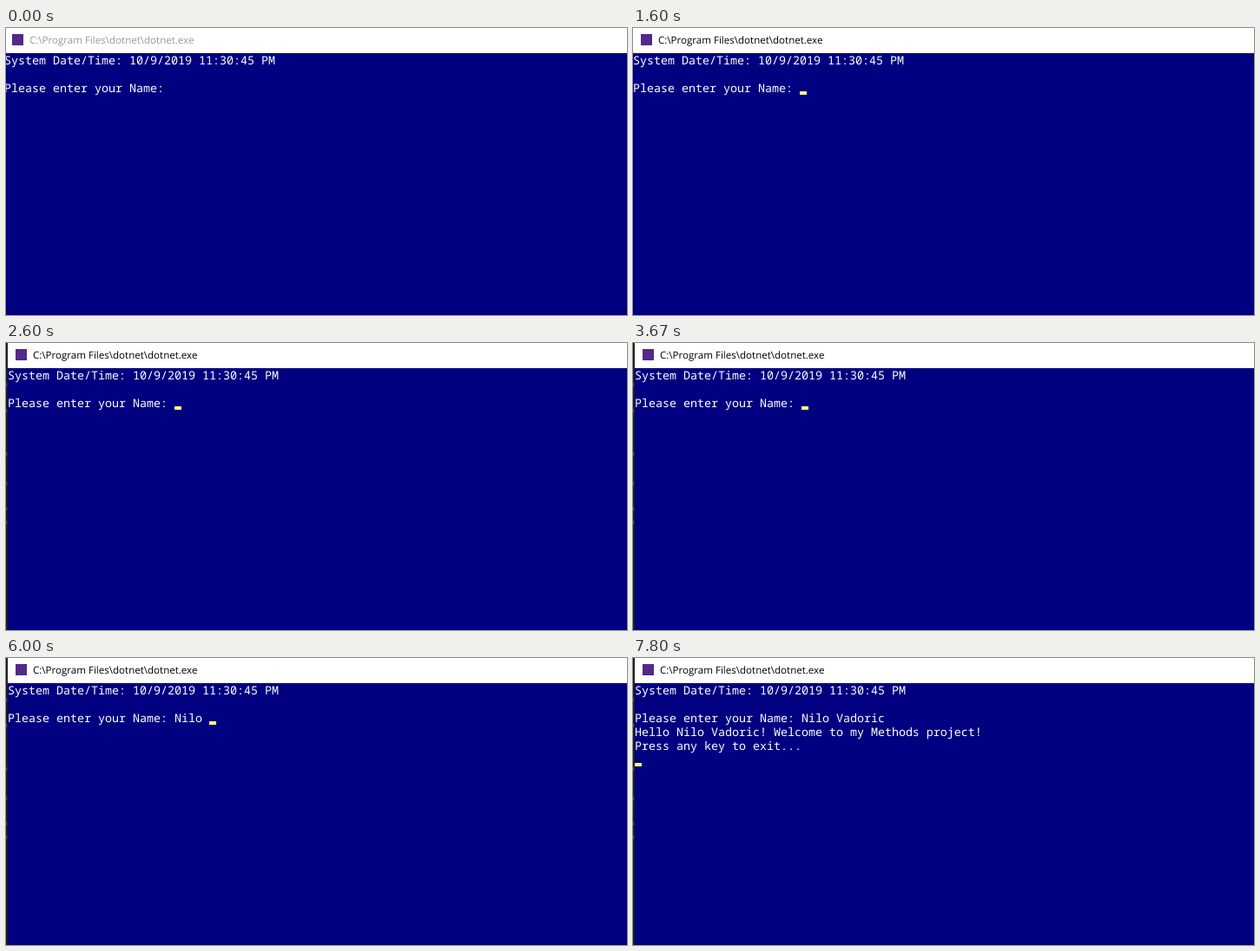
An HTML page for the animation above (8000 ms loop, 715 by 331 pixels).

```html
<!DOCTYPE html>
<html lang="en">
<head>
<meta charset="utf-8">
<title>Console</title>
<style>
  html, body { margin: 0; width: 100%; height: 100%; overflow: hidden; background: #1e1e1e; }
  #stage { position: relative; width: 715px; height: 331px; overflow: hidden; }
  #stage * { position: absolute; margin: 0; }
  .speck { left: 0; width: 1px; height: 4px; background: #555; }
  #window { top: 0; width: 730px; height: 331px; background: linear-gradient(#fff 29px, #000080 29px); }
  #icon { left: 9px; top: 7px; width: 13px; height: 13px; background: #53298a; }
  #title { left: 29px; top: 0; font: 11.55px/29px "Open Sans", sans-serif; white-space: pre; text-rendering: geometricPrecision; }
  #screen { left: 0; top: 29px; color: #fff; font: 500 13.333px/16px "Noto Sans Mono", monospace; text-rendering: geometricPrecision; }
  #cursor { width: 8px; height: 4px; background: #ffff7f; }
</style>
</head>
<body>
<div id="stage">
  <div class="speck" style="top: 46px"></div>
  <div class="speck" style="top: 76px"></div>
  <div class="speck" style="top: 126px"></div>
  <div class="speck" style="top: 160px"></div>
  <div class="speck" style="top: 189px"></div>
  <div class="speck" style="top: 205px"></div>
  <div id="window">
    <div id="icon"></div>
    <div id="title">C:\Program Files\dotnet\dotnet.exe</div>
    <pre id="screen"></pre>
    <div id="cursor"></div>
  </div>
</div>
<script>
const LOOP = 8000, CELL = 8, ROW = 16, TOP = 29;
const NAME = "Nilo Vadoric";
const HEADER = "System Date/Time: 10/9/2019 11:30:45 PM\n\n";
const PROMPT = "Please enter your Name: ";
const REPLY = `\nHello ${NAME}! Welcome to my Methods project!\nPress any key to exit...\n`;

const FOCUS = 1000, ENTER = 7800;
const keyTimes = [5070, 5200, 5330, 5400, 6000, 6330, 6670, 6800, 6930, 7130, 7200, 7470];
const cursorOn = [1530, 2600, 3670, 4730, ...keyTimes, ENTER];
const cursorOff = [0, 2070, 3130, 4200, 5270, 5800, 6870, 7400];
const windowMoves = [[0, -2], [1600, 0], [1670, 1], [1800, 2]];

const [win, title, screen, cursor] =
  ["window", "title", "screen", "cursor"].map(id => document.getElementById(id));
const latest = (times, t) => Math.max(-1, ...times.filter(time => time <= t));

function draw(t) {
  const typed = keyTimes.filter(time => time <= t).length;
  const text = HEADER + PROMPT + NAME.slice(0, typed) + (t >= ENTER ? REPLY : "");
  const lines = text.split("\n");

  win.style.left = windowMoves.filter(([time]) => time <= t).pop()[1] + "px";
  title.style.color = t < FOCUS ? "#999" : "#000";
  if (screen.textContent !== text) screen.textContent = text;

  cursor.style.left = lines.at(-1).length * CELL + "px";
  cursor.style.top = TOP + lines.length * ROW - 4 + "px";
  cursor.hidden = latest(cursorOn, t) < latest(cursorOff, t);
}

const start = performance.now();
function tick() {
  draw((performance.now() - start) % LOOP);
  requestAnimationFrame(tick);
}
tick();
</script>
</body>
</html>
```
